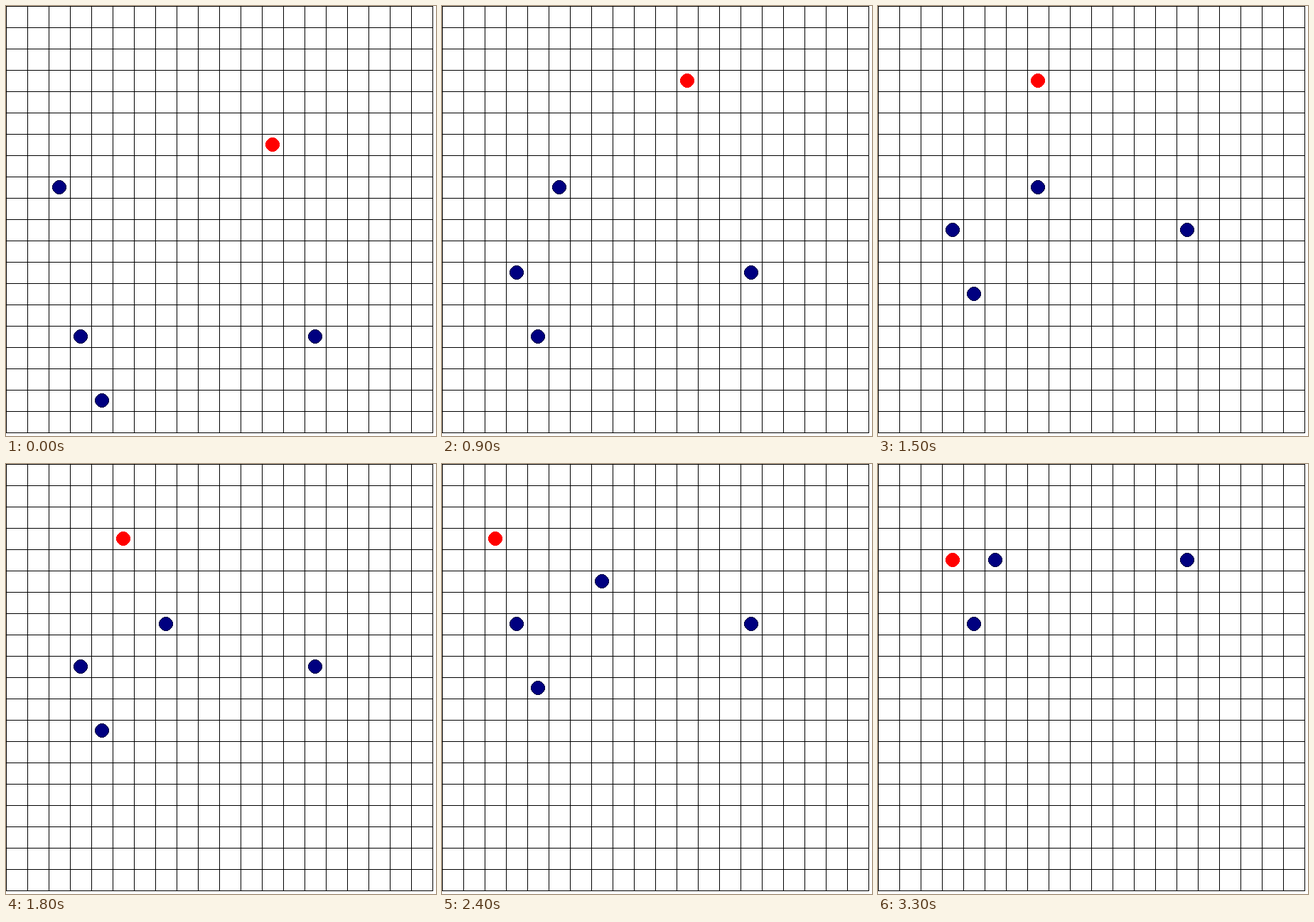
An HTML page for the animation above (3600 ms loop, 605x605 px).

```html
<!DOCTYPE html>
<html lang="en">
<head>
<meta charset="utf-8">
<title>Grid chase</title>
<style>
  html, body { margin: 0; width: 100%; height: 100%; overflow: hidden; background: #fff; }
  svg { display: block; width: 605px; height: 605px; shape-rendering: crispEdges; }
  circle { r: 9.5px; stroke-width: 1px; animation: 3600ms step-end infinite; }
  .hunter { fill: #000080; stroke: #000040; }
  .climber { animation-name: climb; animation-timing-function: steps(12, end); }
  .chaser { animation-name: chase; }
  .prey { fill: #f00; stroke: #f00; animation-name: flee; }

  /* Each grid cell is 30px; one move every 300ms. */
  @keyframes climb { to { transform: translateY(-360px); } }

  @keyframes chase {
    0%       { transform: translate(60px, 240px); }
    8.3333%  { transform: translate(90px, 240px); }
    16.6666% { transform: translate(120px, 240px); }
    25%      { transform: translate(150px, 240px); }
    33.3333% { transform: translate(180px, 240px); }
    41.6666% { transform: translate(210px, 240px); }
    50%      { transform: translate(210px, 210px); }
    58.3333% { transform: translate(210px, 180px); }
    66.6666% { transform: translate(210px, 150px); }
    75%      { transform: translate(180px, 150px); }
    83.3333% { transform: translate(180px, 120px); }
    91.6666%, 100% { transform: translate(150px, 120px); }
  }

  @keyframes flee {
    0%       { transform: translate(360px, 180px); }
    8.3333%  { transform: translate(420px, 120px); }
    16.6666% { transform: translate(390px, 90px); }
    25%      { transform: translate(330px, 90px); }
    33.3333% { transform: translate(270px, 90px); }
    41.6666% { transform: translate(210px, 90px); }
    50%      { transform: translate(150px, 90px); }
    58.3333% { transform: translate(90px, 90px); }
    66.6666% { transform: translate(60px, 90px); }
    75%      { transform: translate(60px, 60px); }
    83.3333% { transform: translate(30px, 60px); }
    91.6666%, 100% { transform: translate(90px, 120px); }
  }
</style>
</head>
<body>
<svg viewBox="0 0 605 605">
  <defs>
    <pattern id="cell" width="30" height="30" patternUnits="userSpaceOnUse">
      <path d="M0 0H30V1H1V30H0Z"/>
    </pattern>
  </defs>
  <rect width="601" height="601" fill="url(#cell)"/>
  <circle class="hunter climber" cx="105" cy="465"/>
  <circle class="hunter climber" cx="435" cy="465"/>
  <circle class="hunter climber" cx="135" cy="555"/>
  <circle class="hunter chaser" cx="15" cy="15"/>
  <circle class="prey" cx="15" cy="15"/>
</svg>
</body>
</html>
```
